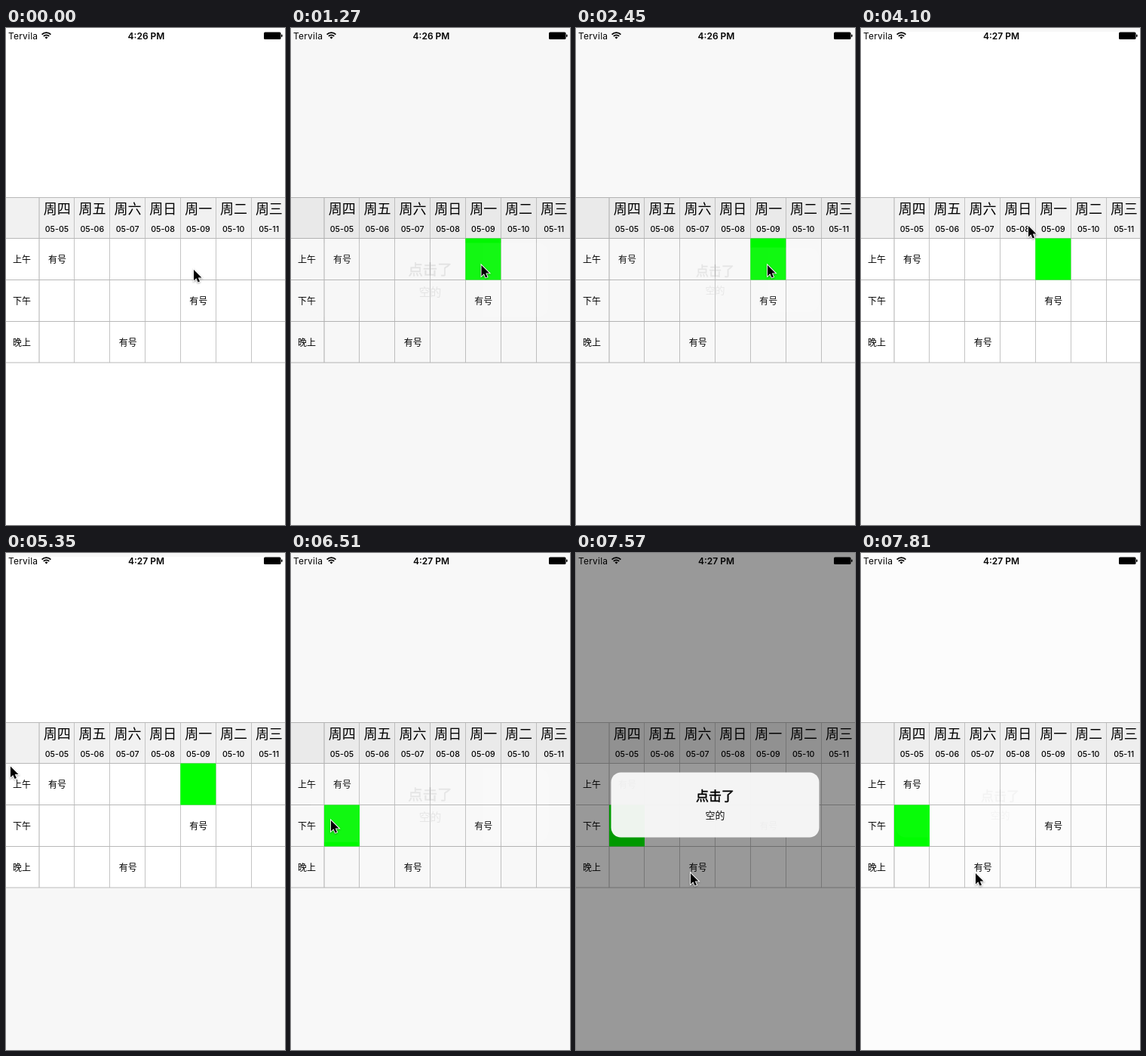
An HTML page for the animation above (7990 ms loop, 370 by 658 pixels).

```html
<!DOCTYPE html>
<html lang="zh-CN">
<head>
<meta charset="utf-8">
<title>Booking grid</title>
<style>
html, body { margin: 0; width: 100%; height: 100%; overflow: hidden; background: #fff; }
svg { display: block; width: 370px; height: 658px; }
text { font-family: "Noto Sans CJK SC", "Noto Sans CJK", sans-serif; text-anchor: middle; }
.latin { font-family: Inter, "Liberation Sans", sans-serif; }
#cursor { filter: drop-shadow(0 1px 1px rgba(0, 0, 0, .35)); }
</style>
</head>
<body>
<svg viewBox="0 0 370 658">
  <rect width="370" height="658" fill="#fff"/>
  <rect y="224" width="370" height="54.5" fill="#f1f1f1"/>
  <g id="grid"></g>
  <rect id="cell" width="47" height="55" fill="#0f0"/>
  <g id="labels"></g>

  <g id="status">
    <text class="latin" x="3" y="14.5" font-size="12" style="text-anchor:start" textLength="39">Tervila</text>
    <text id="clock" class="latin" x="186" y="14.5" font-size="12" font-weight="600"></text>
    <g fill="none" stroke="#000" stroke-width="1.7">
      <path d="M47.6 8.6a8.2 8.2 0 0 1 11.8 0M49.8 10.9a5.1 5.1 0 0 1 7.4 0"/>
      <path d="M53.5 14.6L51.5 12.6a2.8 2.8 0 0 1 4 0Z" fill="#000" stroke="none"/>
    </g>
    <rect x="342" y="5.5" width="22.5" height="9.5" rx="1.6"/>
    <rect x="365" y="8.5" width="1.5" height="3.5" rx=".7"/>
  </g>

  <path id="edges" d="M0 0H370V5H0ZM0 444H370V658H0Z" fill-opacity=".03"/>
  <rect id="dim" width="370" height="658"/>
  <g id="alert">
    <rect x="46.5" y="290.5" width="276" height="86" rx="13" fill="#f8f8f8" fill-opacity=".96"/>
    <text x="184.5" y="328" font-size="17" stroke="#000" stroke-width=".45">点击了</text>
    <text x="184.5" y="352" font-size="13" fill="#111">空的</text>
  </g>
  <g id="cursor">
    <path d="M0 0V14.5L3.4 11.3L5.6 16.4L8 15.4L5.8 10.4H10.5Z" stroke="#fff" stroke-width="1.8" paint-order="stroke"/>
  </g>
  <g id="ring" fill="none">
    <circle r="10" stroke="#000"/>
    <circle r="9" stroke="#fff"/>
  </g>
</svg>
<script>
const LOOP = 7990, LEFT = 44, COL = 46.86;
const rows = [278.5, 333.5, 388.5, 443];
const $ = id => document.getElementById(id);

function add(parent, tag, attrs, text = '') {
  const el = document.createElementNS('http://www.w3.org/2000/svg', tag);
  for (const k in attrs) el.setAttribute(k, attrs[k]);
  el.textContent = text;
  $(parent).append(el);
}
const label = (x, y, size, text, extra) =>
  add('labels', 'text', { x, y, 'font-size': size, ...extra }, text);
const line = (d, stroke) => add('grid', 'path', { d, stroke, 'stroke-width': 1 });
const colMid = i => LEFT + COL * (i + .5);

[...'四五六日一二三'].forEach((day, i) => {
  const x = Math.floor(LEFT + COL * i) + (i ? .5 : 0);
  line(`M${x} 224V443`, i ? '#c4c4c4' : '#b0b0b0');
  label(colMid(i) + .3, 245.7, 18, '周' + day);
  label(colMid(i), 270, 10.6, '05-' + String(5 + i).padStart(2, '0'), { class: 'latin', 'font-weight': 500 });
});
[224.5, ...rows].forEach(y => line(`M0 ${y}H370`, '#b8b8b8'));
['上午', '下午', '晚上'].forEach((name, i) => label(21, 310.5 + 55 * i, 12, name));
[[0, 0], [4, 1], [2, 2]].forEach(([c, r]) => label(colMid(c) + .5, 310.5 + 55 * r, 12, '有号'));

// [ms, opacity], each held until the next
const fade = [
  [0, 0], [1180, .08], [1290, .5], [1390, .89], [1480, .97], [1650, 1],
  [2280, .8], [2360, .3], [2450, .07], [2540, .02], [2630, 0],
  [6510, .07], [6580, .5], [6660, .9], [6740, .97], [6810, 1],
  [7580, .8], [7640, .4], [7700, .15], [7750, .07], [7810, .03]
];
// [ms, x, y] of the pointer tip
const path = [
  [0, 249, 320], [60, 249, 320], [230, 252.5, 314], [2280, 252.5, 314], [2360, 254, 314],
  [2500, 254, 314], [2630, 322, 290], [3000, 322, 290], [3200, 297, 275], [3290, 301, 273],
  [3840, 301, 273], [4100, 222, 262], [4260, 222, 262], [4880, 12, 254], [5100, 12, 254],
  [5330, 5, 280], [5580, 16, 311], [5970, 16, 311], [6210, 53, 354], [6860, 53, 354],
  [7220, 110, 392], [7310, 110, 392], [7560, 152, 424], [LOOP, 152, 424]
];
const clicks = [[1100, 1180], [3500, 3560], [5750, 5810], [6450, 6510]];
const within = (t, [a, b]) => t >= a && t < b;
const show = (id, on) => $(id).setAttribute('visibility', on ? 'visible' : 'hidden');

function pointer(t) {
  const i = path.findIndex(p => p[0] > t);
  const [t0, x0, y0] = path[i - 1], [t1, x1, y1] = path[i];
  const k = (t - t0) / (t1 - t0);
  return `translate(${x0 + (x1 - x0) * k} ${y0 + (y1 - y0) * k})`;
}

function draw(t) {
  const a = fade.filter(f => f[0] <= t).pop()[1];
  const opening = t < 2280 || within(t, [6510, 7580]);
  const scale = opening ? 1 + .165 * (1 - a) ** 2 : 1;
  $('dim').setAttribute('opacity', .4 * a);
  $('alert').setAttribute('opacity', a);
  $('alert').setAttribute('transform', `translate(184.5 333.5) scale(${scale}) translate(-184.5 -333.5)`);

  const second = t >= 6510;
  show('cell', t >= 1180);
  $('cell').setAttribute('x', second ? 44 : 231.3);
  $('cell').setAttribute('y', second ? rows[1] : rows[0]);
  show('edges', within(t, [2630, 6510]));
  $('clock').textContent = t < 3980 ? '4:26 PM' : '4:27 PM';

  const at = pointer(t);
  $('cursor').setAttribute('transform', at);
  $('ring').setAttribute('transform', at);
  show('ring', clicks.some(c => within(t, c)));
}

const start = performance.now();
(function tick() {
  draw((performance.now() - start) % LOOP);
  requestAnimationFrame(tick);
})();
</script>
</body>
</html>
```
